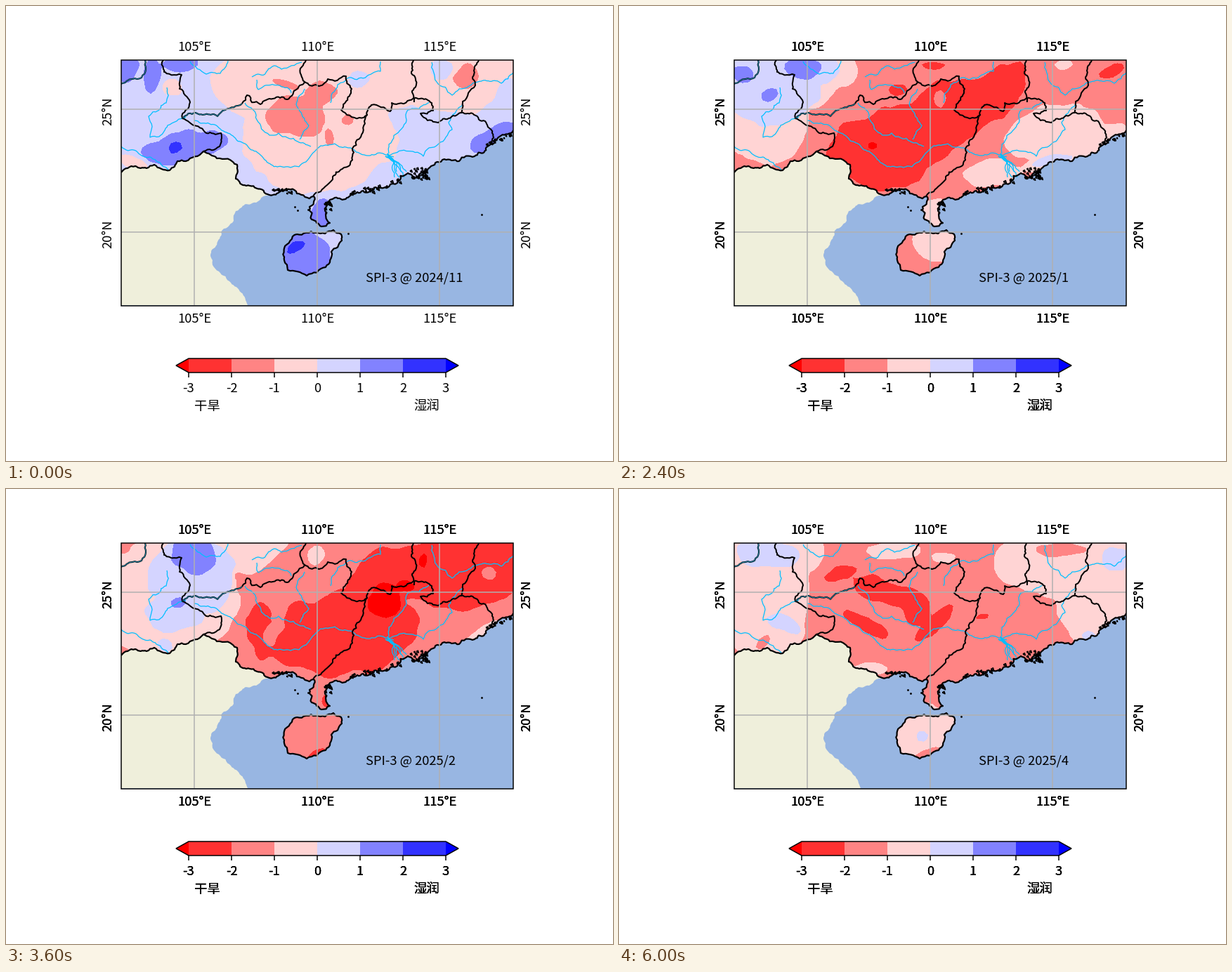
Write a matplotlib script that moves like this. It is 864 by 648 pixels and loops after 7200 ms.

```python
import math
import random

import matplotlib.pyplot as plt
import numpy as np
from matplotlib.animation import FuncAnimation
from matplotlib.patches import Polygon, Rectangle
from matplotlib.path import Path

DPI = 135
PX = 72 / DPI
LEFT, RIGHT, TOP, BOTTOM = 163.8, 721.8, 77.4, 427
LAND, SEA, RIVER, GRID = "#efefdb", "#98b6e2", "#00bfff", "#b0b0b0"
TONES = ["#ff0000", "#ff3232", "#ff8484", "#ffd4d4",
         "#d4d4ff", "#8282ff", "#3232ff", "#0000ff"]
LEVELS = [-9, -3, -2, -1, 0, 1, 2, 3, 9]

plt.rcParams["font.family"] = "Noto Sans CJK JP"
plt.rcParams["font.size"] = 9.8
rng = random.Random(4)

fig = plt.figure(figsize=(6.4, 4.8), dpi=DPI, facecolor="white")
ax = fig.add_axes([0, 0, 1, 1])
ax.set_xlim(0, 864)
ax.set_ylim(648, 0)
ax.axis("off")
frame = Rectangle((LEFT, TOP), RIGHT - LEFT, BOTTOM - TOP, fc="none",
                  ec="black", lw=0.8, zorder=9)
ax.add_patch(frame)


def rough(*v, amp=0.15):
    """Join key points with a line broken at shifted midpoints."""
    def split(a, b):
        dx, dy = b[0] - a[0], b[1] - a[1]
        if math.hypot(dx, dy) < 4:
            return [b]
        k = rng.uniform(-amp, amp)
        m = ((a[0] + b[0]) / 2 - k * dy, (a[1] + b[1]) / 2 + k * dx)
        return split(a, m) + split(m, b)

    keys = list(zip(v[::2], v[1::2]))
    pts = keys[:1]
    for a, b in zip(keys, keys[1:]):
        pts += split(a, b)
    return pts


def line(pts, color="black", width=2.0, z=5):
    ln, = ax.plot(*zip(*pts), color=color, lw=width * PX, zorder=z,
                  solid_joinstyle="round", solid_capstyle="butt")
    ln.set_clip_path(frame)


def border(*v):
    line(rough(*v, amp=0.2))


def river(*v):
    line(rough(*v), RIVER, 1.25, 4)


def border_river(*v):
    pts = rough(*v)
    line(pts, width=2.1)
    line(pts, "#1a8fb4", 0.9, 6)


def patch(pts, color, z):
    ax.add_patch(Polygon(pts, fc=color, lw=0, zorder=z))


# Land and sea
south = rough(164, 237, 184, 228, 200, 231, 211, 226, 233, 234, 244, 221, 256, 221,
              281, 207, 300, 217, 329, 226, 327, 246, 342, 256, 380, 269)
coast = rough(380, 269, 394, 262, 414, 267, 438, 271, 432, 286, 435, 304, 449, 314,
              461, 309, 454, 289, 455, 280, 468, 273, 500, 265, 533, 259, 557, 252,
              572, 238, 588, 243, 605, 228, 645, 221, 667, 214, 690, 197, 722, 177,
              amp=0.22)
gulf = rough(380, 269, 356, 280, 327, 292, 324, 306, 306, 322, 291, 356, 303, 378,
             320, 394, 344, 426)
island = rough(414, 325, 441, 323, 466, 319, 477, 325, 478, 334, 463, 350, 455, 372,
               428, 384, 401, 376, 396, 362, 396, 345, 414, 325)
corners = [(722, 77), (164, 77)]
inland = south + coast + corners
clip = Path.make_compound_path(Path(inland + inland[:1], closed=True),
                               Path(island, closed=True))
ax.add_patch(Rectangle((LEFT, TOP), RIGHT - LEFT, BOTTOM - TOP, fc=SEA, lw=0, zorder=0))
patch(coast[::-1] + gulf + [(164, 426)] + corners[::-1], LAND, 1)
patch(island, LAND, 1)
for pts in (south, coast, island):
    line(pts, width=2.2)

# Islets and ragged bays
for x, y, w, h, n in [(587, 239, 13, 8, 32), (392, 264, 14, 3, 12), (537, 257, 28, 4, 12),
                      (700, 191, 18, 3, 16), (455, 288, 6, 9, 10), (493, 267, 22, 3, 8)]:
    for _ in range(n):
        dx, s = rng.uniform(-w, w), rng.uniform(1, 3)
        u, v = x + dx, y + rng.uniform(-h, h) - dx * 0.3 * (w > 14)
        line([(u, v), (u + s, v - s * 0.6), (u + s * 1.4, v + s * 0.7), (u, v)], width=1.7)
ax.plot([411, 415, 677, 487, 430], [286, 291, 297, 324, 290], "o",
        color="black", ms=1.5, mew=0, zorder=5)

border(224, 77, 224, 90, 250, 98, 247, 118, 262, 137, 251, 160, 272, 171, 285, 181,
       306, 181, 304, 200, 281, 207)
border(336, 139, 343, 127, 362, 140, 380, 132, 400, 133, 425, 108, 420, 98, 427, 77)
border(425, 108, 443, 113, 458, 104, 484, 100, 492, 118, 477, 148, 503, 159, 514, 155,
       508, 180, 493, 203, 490, 224, 465, 243, 457, 255, 437, 271)
border(514, 155, 520, 141, 547, 150, 549, 138, 575, 134, 606, 138, 608, 149, 590, 153,
       600, 163, 630, 160, 648, 152)
border(580, 77, 577, 96, 583, 104, 578, 121, 581, 137)
border(673, 77, 668, 113, 650, 136, 648, 152, 682, 164, 691, 196)
border_river(164, 111, 180, 104, 193, 102, 199, 90, 198, 77)
border_river(251, 160, 270, 152, 301, 157, 312, 148, 336, 139)

river(268, 163, 305, 175, 340, 196, 370, 220, 405, 230, 427, 222, 448, 199, 487, 202,
      510, 212, 552, 215)
river(340, 138, 357, 162, 375, 184, 388, 181, 415, 193, 434, 200)
river(425, 118, 413, 140, 431, 170, 418, 190)
river(262, 79, 285, 97, 305, 96, 316, 78)
river(350, 101, 382, 85, 392, 90, 421, 80)
river(357, 105, 359, 119, 400, 116, 406, 124)
river(462, 138, 472, 112, 488, 102, 533, 93, 533, 79)
river(606, 80, 613, 108, 635, 127, 645, 118, 672, 108, 705, 110, 722, 95)
river(602, 137, 572, 148, 563, 175, 545, 197, 545, 210)
river(650, 140, 630, 166, 635, 176, 594, 214, 545, 213)
river(164, 200, 205, 215, 233, 234)
river(229, 116, 228, 138, 203, 157, 205, 187, 218, 186, 230, 170, 256, 158)
for end in (553, 560, 567):
    river(543, 210, 552, 222, end, 244)
    river(540, 214, 556, 222, end + 3, 236)

# Drought index: soft ellipses laid over a base value, with wavy edges
X, Y = np.meshgrid(np.linspace(LEFT, RIGHT, 94), np.linspace(TOP, 392, 54))


def waves():
    total = 0
    for size in (70, 45, 32, 24):
        a, p = rng.uniform(0, math.tau), rng.uniform(0, math.tau)
        total = total + size / 26 * np.sin(
            (X * math.cos(a) + Y * math.sin(a)) * math.tau / size + p)
    return total


months = []


def month(name, base, *spots):
    """Each spot is value, x, y, half width, half height and optional tilt."""
    field = np.full(X.shape, base)
    wx, wy = X + waves(), Y + waves()
    for value, x, y, rx, ry, *tilt in spots:
        t = math.radians(tilt[0] if tilt else 0)
        small = min(1, min(rx, ry) / 20)
        dx = X + (wx - X) * small - x
        dy = Y + (wy - Y) * small - y
        r = np.hypot((dx * math.cos(t) - dy * math.sin(t)) / rx,
                     (dx * math.sin(t) + dy * math.cos(t)) / ry)
        field += (value - field) * (1 - np.tanh((r - 1) * min(rx, ry) / 3)) / 2
    shape = ax.contourf(X, Y, field, levels=LEVELS, colors=TONES, zorder=2)
    shape.set_clip_path(clip, ax.transData)
    months.append((name, shape))


month("2024/11", 0.5,
      (-.5, 440, 110, 150, 65), (-.5, 440, 190, 105, 78), (-.5, 510, 190, 48, 42),
      (-.5, 640, 100, 95, 52), (.5, 722, 140, 28, 38), (-.5, 236, 115, 13, 13),
      (-.5, 182, 224, 24, 10, -20), (.5, 620, 90, 15, 15), (.5, 503, 104, 14, 10),
      (-1.5, 415, 155, 43, 31), (-1.5, 448, 125, 21, 16), (-1.5, 398, 111, 22, 6, -15),
      (-1.5, 486, 163, 9, 10), (-1.5, 460, 186, 8, 13), (-1.5, 655, 100, 17, 17),
      (1.5, 172, 88, 15, 17), (1.5, 208, 100, 11, 25), (1.5, 247, 82, 26, 11),
      (1.5, 255, 200, 60, 21, 12), (2.5, 240, 202, 9, 7), (1.5, 695, 187, 38, 14, 25),
      (1.5, 448, 295, 15, 20), (1.5, 428, 355, 36, 36), (2.5, 412, 344, 15, 7, 20))
month("2024/12", -0.5,
      (.5, 205, 115, 75, 62), (.5, 275, 85, 40, 18), (1.5, 176, 103, 11, 9),
      (1.5, 216, 121, 12, 8), (1.5, 262, 83, 13, 9), (-1.5, 400, 190, 118, 48, 12),
      (-1.5, 430, 130, 60, 48), (-1.5, 385, 238, 70, 36), (-1.5, 450, 220, 70, 48),
      (-1.5, 525, 170, 47, 50), (-1.5, 535, 110, 50, 18, 18), (-1.5, 645, 115, 65, 24, 18),
      (-1.5, 705, 92, 25, 26), (-1.5, 168, 226, 13, 12), (-1.5, 212, 220, 26, 11, 10),
      (-.5, 517, 132, 12, 9), (-2.5, 380, 170, 24, 14), (-2.5, 378, 205, 16, 30),
      (-2.5, 392, 240, 24, 26), (-1.5, 388, 225, 9, 10), (-2.5, 338, 233, 12, 13),
      (.5, 452, 305, 14, 10), (.5, 437, 350, 50, 42), (1.5, 438, 356, 14, 8, -30))
month("2025/1", -1.5,
      (-.5, 260, 100, 80, 45, 20), (-.5, 210, 160, 62, 64), (.5, 215, 110, 70, 58),
      (.5, 275, 90, 38, 24), (1.5, 176, 98, 15, 11), (1.5, 215, 126, 13, 8, 30),
      (1.5, 262, 88, 28, 15), (-2.5, 395, 192, 102, 48, 12), (-2.5, 480, 145, 75, 40, 10),
      (-2.5, 545, 115, 42, 30, 35), (-2.5, 378, 225, 62, 38), (-.5, 620, 180, 70, 38, 10),
      (-.5, 530, 240, 40, 19), (-.5, 690, 195, 38, 22, 35), (.5, 615, 222, 35, 9, 12),
      (-1.5, 456, 133, 8, 12), (-3.5, 362, 198, 8, 6), (-2.5, 398, 119, 15, 9, 15),
      (-2.5, 448, 85, 19, 6), (-2.5, 700, 92, 20, 9, 20), (-.5, 634, 83, 13, 7),
      (-.5, 447, 296, 19, 22), (-.5, 450, 337, 30, 24))
month("2025/2", -1.5,
      (-.5, 230, 155, 100, 85), (-.5, 330, 90, 75, 32, 15), (-1.5, 168, 85, 8, 9),
      (.5, 265, 125, 62, 52), (.5, 240, 175, 42, 27), (.5, 225, 222, 9, 10),
      (1.5, 268, 92, 29, 30), (1.5, 245, 162, 11, 7), (-.5, 440, 95, 13, 13),
      (-2.5, 660, 110, 95, 60, 15), (-2.5, 545, 125, 66, 38, 30),
      (-2.5, 490, 205, 100, 60, 10), (-2.5, 440, 182, 40, 24), (-2.5, 415, 225, 40, 28),
      (-2.5, 363, 200, 19, 43), (-1.5, 375, 208, 9, 14), (-3.5, 540, 160, 23, 25),
      (-3.5, 570, 137, 14, 8), (-3.5, 594, 103, 7, 11), (-1.5, 687, 121, 11, 9),
      (-.5, 682, 205, 38, 9, 30), (-2.5, 456, 302, 7, 11), (-2.5, 445, 377, 15, 6, 20))
month("2025/3", -1.5,
      (-.5, 225, 150, 55, 75), (-.5, 170, 150, 30, 66), (-.5, 262, 110, 62, 50),
      (.5, 215, 95, 60, 48), (1.5, 234, 79, 25, 6), (-.5, 331, 157, 16, 15),
      (-2.5, 388, 158, 25, 10), (-2.5, 500, 187, 76, 30, 15), (-2.5, 430, 220, 45, 15, 10),
      (-2.5, 355, 203, 14, 8), (-2.5, 348, 232, 20, 8), (-2.5, 525, 121, 14, 4, 15),
      (-2.5, 582, 141, 22, 6, 5), (-2.5, 618, 87, 12, 8, 30), (-.5, 665, 192, 72, 23, 30),
      (.5, 695, 194, 38, 9, 40), (-.5, 704, 88, 18, 11), (-.5, 360, 88, 20, 9),
      (-.5, 408, 87, 17, 9), (-.5, 476, 117, 15, 13), (-.5, 565, 87, 13, 11),
      (-.5, 436, 290, 8, 16), (-.5, 438, 344, 22, 20))
month("2025/4", -1.5,
      (-.5, 205, 150, 68, 100), (-.5, 225, 90, 62, 40), (.5, 215, 93, 44, 20, -10),
      (.5, 236, 193, 26, 10, -25), (-1.5, 206, 219, 14, 7, 40), (-.5, 388, 88, 38, 13),
      (-.5, 462, 97, 18, 8), (-.5, 665, 105, 130, 54), (-.5, 670, 170, 44, 48),
      (-.5, 705, 170, 40, 40), (-1.5, 630, 86, 38, 10), (.5, 706, 99, 18, 15),
      (.5, 668, 209, 9, 7), (-2.5, 316, 120, 26, 13, 15), (-2.5, 383, 147, 48, 18, -15),
      (-2.5, 425, 170, 18, 22), (-2.5, 350, 192, 38, 11, -30), (-2.5, 450, 190, 36, 12, 45),
      (-2.5, 517, 182, 13, 4), (-.5, 355, 257, 27, 9), (-.5, 437, 350, 50, 42),
      (.5, 432, 351, 8, 7), (-1.5, 435, 380, 25, 9, 20))

# Grid and labels; later months print the fixed labels over themselves
heavy = []


def text(x, y, s, **kw):
    return ax.text(x, y, s, va="baseline", zorder=10, **{"ha": "center", **kw})


def label(*args, **kw):
    text(*args, **kw)
    heavy.extend(text(*args, **kw) for _ in range(2))


for k in range(3):
    x = 268.4 + 174.4 * k
    line([(x, TOP), (x, BOTTOM)], GRID, 1.5, 8)
    for y in (64, 451):
        label(x + 0.5, y, f"{105 + 5 * k}°E")
for k in range(2):
    y = 147.2 + 174.5 * k
    line([(LEFT, y), (RIGHT, y)], GRID, 1.5, 8)
    for x in (150, 746):
        label(x, y + 3, f"{25 - 5 * k}°N", rotation=90, rotation_mode="anchor")

# Colour bar
X0, STEP, Y0, Y1 = 260, 61, 502, 522
X1, MID = X0 + 6 * STEP, (Y0 + Y1) / 2
for k, tone in enumerate(TONES[1:-1]):
    ax.add_patch(Rectangle((X0 + k * STEP, Y0), STEP, Y1 - Y0, fc=tone, lw=0, zorder=2))
patch([(X0, Y0), (242, MID), (X0, Y1)], TONES[0], 2)
patch([(X1, Y0), (644, MID), (X1, Y1)], TONES[-1], 2)
ax.add_patch(Polygon([(X0, Y0), (X1, Y0), (644, MID), (X1, Y1), (X0, Y1), (242, MID)],
                     fc="none", ec="black", lw=0.8, zorder=4))
for k in range(7):
    x = X0 + k * STEP
    ax.plot([x, x], [Y1, Y1 + 6.6], color="black", lw=0.8, solid_capstyle="butt")
    label(x, 550, str(k - 3))
label(286, 576, "干旱")
label(599, 576, "湿润")
caption = text(512, 392.5, "", ha="left")


def draw(i):
    for k, (_, shape) in enumerate(months):
        shape.set_visible(k == i)
    for t in heavy:
        t.set_visible(i > 0)
    caption.set_text(f"SPI-3 @ {months[i][0]}")
    return [caption]


anim = FuncAnimation(fig, draw, frames=len(months), interval=1200,
                     repeat=True, repeat_delay=0, blit=False)
plt.show()
```
